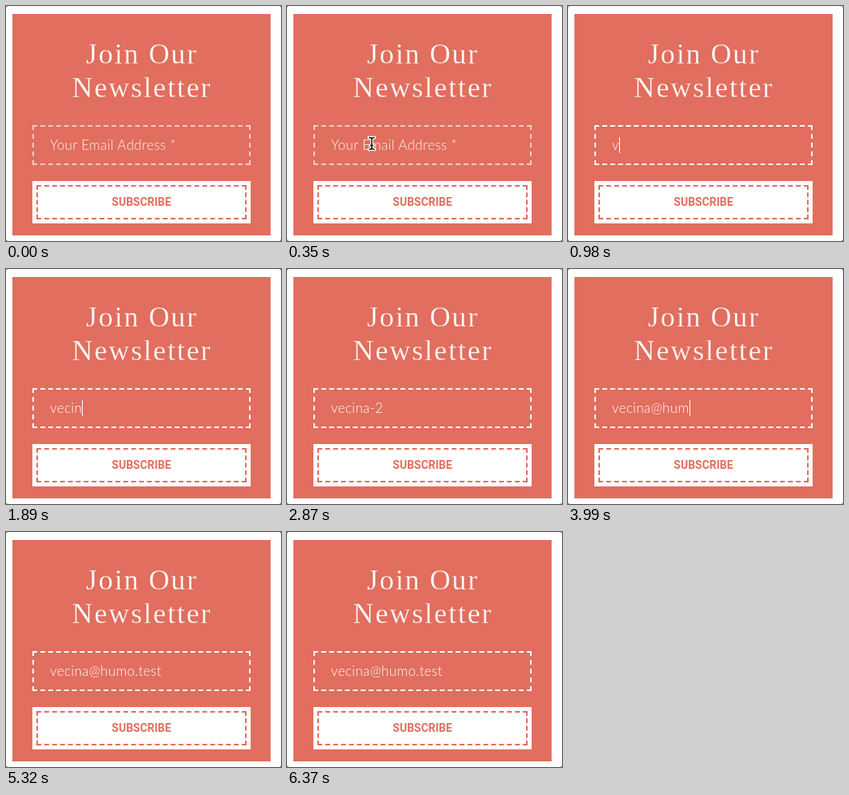
These frames come from a looping animation (344x294 px, 6.44 s). An HTML page:

```html
<!DOCTYPE html>
<html lang="en">
<head>
<meta charset="utf-8">
<title>Newsletter form</title>
<style>
  :root { --coral: #e16e5e; }
  * { box-sizing: border-box; }
  html, body { margin: 0; width: 100%; height: 100%; overflow: hidden; background: #777; }
  #stage { position: absolute; left: 0; top: 0; width: 344px; height: 294px; overflow: hidden; background: #fff; border-radius: 3px; }
  #stage > * { position: absolute; }
  #card { left: 8px; top: 10px; width: 323px; height: 277px; background: var(--coral); }
  h1 {
    left: 8.5px; top: 39px; width: 323px; margin: 0; color: #fff; text-align: center;
    font: 400 36px/42px "Liberation Serif", "Times New Roman", serif; letter-spacing: 1.9px;
    -webkit-text-stroke: .3px var(--coral);
  }
  #field {
    left: 33px; top: 149px; width: 273px; height: 50px; padding-left: 20px;
    border: 2px dashed #fff; color: #fff; white-space: pre;
    font: 300 17px/46px Lato, sans-serif; letter-spacing: .35px;
  }
  #hint { position: absolute; opacity: .92; }
  #caret { position: absolute; top: 13px; width: 1px; height: 20px; background: #fff; }
  #button { left: 33px; top: 219px; width: 273px; height: 53px; padding: 5px; background: #fff; }
  #button span {
    display: block; height: 43px; border: 2px dashed var(--coral); color: var(--coral);
    text-align: center; font: 700 14px/39px Roboto, sans-serif;
  }
  #mouse { left: 0; top: 0; overflow: visible; }
</style>
</head>
<body>
<div id="stage">
  <div id="card"></div>
  <h1>Join Our<br>Newsletter</h1>
  <div id="field"><span id="hint">Your Email Address *</span><span id="typed"></span><span id="caret"></span></div>
  <div id="button"><span>SUBSCRIBE</span></div>
  <svg id="mouse" width="1" height="1" fill="none" stroke-linejoin="round">
    <defs><path id="bar" d="M-3.5-7.5Q0-7.5 0-5.5Q0-7.5 3.5-7.5M0-5.5V5.5M-3.5 7.5Q0 7.5 0 5.5Q0 7.5 3.5 7.5M-2 2.5H2"/></defs>
    <g id="beam">
      <use href="#bar" stroke="#fff" stroke-width="3.8" stroke-linecap="round"/>
      <use href="#bar" stroke="#000" stroke-width="1.4"/>
    </g>
    <path id="arrow" d="M0 0V15L3.5 11.8L6 17L8.3 16L6 10.8H10.5Z" fill="#000" stroke="#fff"/>
  </svg>
</div>
<script>
const LOOP = 6440, TICK = 70;
const $ = id => document.getElementById(id);
const address = "vecina@humo.test";
const head = n => address.slice(0, n);

// [time, text]
const typing = [
  [0, ""], [980, head(1)], [1330, head(2)], [1680, head(3)], [1820, head(4)],
  [1890, head(5)], [2030, head(6)], [2240, head(6) + "-"], [2380, head(6) + "-2"],
  [2940, head(6) + "-"], [3080, head(6)], [3500, head(7)], [3780, head(8)],
  [3920, head(9)], [3990, head(10)], [4130, head(11)], [4200, head(12)],
  [4480, head(13)], [4550, head(14)], [4690, head(15)], [4760, head(16)]
];
const blink = [[0, 0], [420, 1], [2870, 0], [3430, 1], [5320, 0], [5670, 1], [6370, 0]];

// [time, x, y]
const entry = [[70, 132, 254], [210, 116, 200], [350, 106, 172], [490, 105, 169], [700, 102, 168], [840, 100, 168], [980, 100, 168]];
const exit = [[5670, 102, 180], [5740, 103, 203], [5810, 105, 240], [5880, 107, 276], [5950, 108, 300]];

const stepAt = (list, t) => list.findLast(s => s[0] <= t)[1];

function pointAt(path, t) {
  const i = path.findIndex(p => p[0] > t);
  if (i < 1) return null;
  const [a, b] = [path[i - 1], path[i]];
  const k = (t - a[0]) / (b[0] - a[0]);
  return [1, 2].map(n => a[n] + (b[n] - a[n]) * k);
}

function draw(now) {
  const t = Math.floor((now % LOOP) / TICK) * TICK;
  const text = stepAt(typing, t);
  $("typed").textContent = text;
  $("hint").style.display = text ? "none" : "";
  $("caret").style.opacity = stepAt(blink, t) * (text ? 1 : .8);

  const glow = Math.min(1, Math.max(0, (t - 455) / 245));
  $("field").style.borderColor = `rgba(255,255,255,${.65 + .35 * glow})`;

  const at = pointAt(entry, t) || pointAt(exit, t);
  $("mouse").style.display = at ? "" : "none";
  if (at) {
    const [x, y] = at;
    const inField = y > 149 && y < 199;
    $("mouse").style.transform = `translate(${x}px,${y}px)`;
    $("beam").style.display = inField ? "" : "none";
    $("arrow").style.display = inField ? "none" : "";
  }
}

const start = performance.now();
function run() {
  draw(performance.now() - start);
  requestAnimationFrame(run);
}
run();
</script>
</body>
</html>
```
